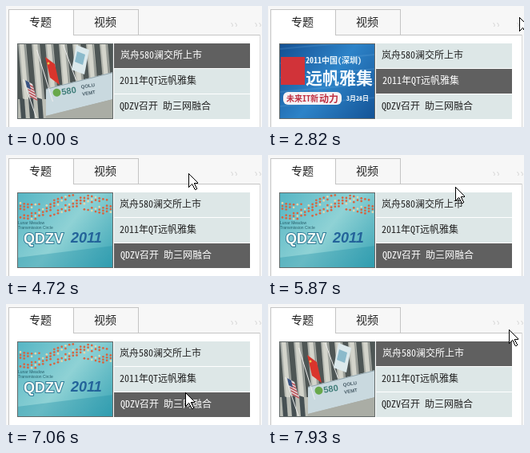
Write an HTML page with a canvas that moves like this. It is 320 px wide and 152 px high and loops after 7.99 s.

```html
<!DOCTYPE html>
<html lang="zh-CN">
<head>
<meta charset="utf-8">
<title>专题</title>
<style>
html, body { margin: 0; width: 100%; height: 100%; overflow: hidden; background: #fff; }
canvas { display: block; width: 320px; height: 152px; }
</style>
</head>
<body>
<canvas id="stage" width="320" height="152"></canvas>
<script>
const ctx = document.getElementById('stage').getContext('2d');
const LOOP = 7990;
const LIST_TOP = 47;
const ROW_STEP = 32;
const CJK = '"Noto Sans Mono CJK SC", "Noto Sans CJK SC", "Noto Sans CJK", sans-serif';
const LATIN = '"Liberation Sans", sans-serif';
const TITLES = ['岚舟580澜交所上市', '2011年QT远帆雅集', 'QDZV召开 助三网融合'];

// The pointer rests between glides.
const ENTRY = { x: 314, y: 14 };
const GLIDES = [
  { start: 2820, end: 3030, x: 283, y: 17 },
  { start: 3560, end: 3990, x: 244, y: 23 },
  { start: 4450, end: 4530, x: 213, y: 23 },
  { start: 4530, end: 4930, x: 244, y: 23 },
  { start: 5690, end: 6080, x: 222, y: 60 },
  { start: 6310, end: 6550, x: 222, y: 93 },
  { start: 6750, end: 6870, x: 224, y: 116 },
  { start: 7030, end: 7300, x: 224, y: 70 },
  { start: 7300, end: 7810, x: 304, y: 66 },
  { start: 7840, end: 7930, x: 301, y: 32 }
];

function pointerAt(time) {
  let { x, y } = ENTRY;
  for (const glide of GLIDES) {
    const k = Math.min(1, Math.max(0, (time - glide.start) / (glide.end - glide.start)));
    x += (glide.x - x) * k;
    y += (glide.y - y) * k;
  }
  return { x: Math.round(x), y: Math.round(y) };
}

// Hovering picks a row; otherwise the list advances every three seconds.
function selectedRow(time, pointer) {
  if (pointer.y >= LIST_TOP) return Math.floor((pointer.y - LIST_TOP) / ROW_STEP);
  return Math.floor((time + 2410) / 3000) % TITLES.length;
}

function rect(x, y, w, h, color) {
  ctx.fillStyle = color;
  ctx.fillRect(x, y, w, h);
}

// Parallelogram: the bottom shifts by dx, the right side by dy.
function quad(color, x, y, w, h, dx = 0, dy = 0) {
  ctx.fillStyle = color;
  ctx.beginPath();
  ctx.moveTo(x, y);
  ctx.lineTo(x + w, y + dy);
  ctx.lineTo(x + w + dx, y + h + dy);
  ctx.lineTo(x + dx, y + h);
  ctx.fill();
}

function circle(x, y, r, color) {
  ctx.fillStyle = color;
  ctx.beginPath();
  ctx.arc(x, y, r, 0, Math.PI * 2);
  ctx.fill();
}

function text(str, x, y, size, color, style = '', family = CJK) {
  ctx.font = `${style} ${size}px ${family}`;
  ctx.fillStyle = color;
  ctx.fillText(str, x, y);
}

// Picture coordinates start at its own top left corner, 120 by 95.
function backdrop(...colors) {
  const fill = ctx.createLinearGradient(0, 0, 120, 95);
  colors.forEach((color, i) => fill.addColorStop(i / (colors.length - 1), color));
  rect(0, 0, 120, 95, fill);
}

function drawBuilding() {
  backdrop('#a3a8a4', '#bfc1b8', '#8d918d');
  for (let x = -6; x < 120; x += 17) {
    quad('#4e5655', x, 0, 7, 70, 6);
    quad('#d3d4cb', x + 9, 0, 5, 70, 6);
    quad('#848a87', x + 15, 0, 1, 70, 6);
  }
  for (let x = 3; x < 36; x += 11) quad('#465053', x, 68, 6, 27, 2, 2);
  quad('#c9d9df', 36, 57, 84, 34, 0, -21);
  quad('#93a5ac', 36, 57, 84, 1, 0, -21);
  quad('#aaada5', 36, 91, 84, 25, 0, -21);

  quad('#eee', 24, 8, 1, 65, 20);
  quad('#d9352c', 35, 17, 12, 26, 6, 9);
  circle(39, 25, 1.5, '#edc34e');
  quad('#eee', 57, 2, 1, 44, 16);
  quad('#dce9ec', 74, 2, 16, 31, -6, 6);
  quad('#8bbacb', 75, 10, 10, 13, -3, 4);

  quad('#eee', 7, 45, 1, 50, 17);
  quad('#e5dcdd', 10, 46, 9, 21, 6, 5);
  for (let y = 49; y < 67; y += 4) quad('#b94d54', 10 + (y - 46) * 0.3, y, 9, 2, 0.5, 5);
  quad('#385282', 10, 46, 5, 9, 2, 3);

  ctx.save();
  ctx.translate(48, 65);
  ctx.rotate(-0.16);
  circle(2, -3, 5, '#68a84b');
  text('580', 8, 1, 11, '#3f7d79', 'bold', LATIN);
  text('QOLU', 33, -3, 6, '#465b66', 'bold', LATIN);
  text('VEMT', 33, 6, 6, '#465b66', 'bold', LATIN);
  ctx.restore();
}

function drawSummit() {
  backdrop('#134f92', '#2d83c8', '#145396');
  for (let y = 6; y < 95; y += 18) quad('rgba(142,203,239,.15)', 0, y, 120, 2, 0, -11);
  text('2011中国(深圳)', 33, 25, 10, '#eaf5fb', 'bold');
  rect(2, 17, 30, 35, '#d13339');
  text('远帆雅集', 33, 51, 21, '#f5fbff', 'bold');
  ctx.fillStyle = '#f6f3f5';
  ctx.beginPath();
  ctx.roundRect(5, 61, 73, 16, 6);
  ctx.fill();
  text('未来IT新', 9, 73, 10, '#bf3042', 'bold');
  text('动力', 50, 74, 12, '#bf3042', 'bold');
  text('3月28日', 84, 72, 8, '#f4f8fb', 'bold');
}

function drawConference() {
  backdrop('#55b5c4', '#8fd2d5', '#39a4b5');
  quad('rgba(30,142,163,.35)', 0, 82, 120, 30, 0, -15);
  for (let row = 0; row < 6; row++) {
    for (let col = 0; col < 25; col++) {
      if (Math.sin(col * 0.7 + row * 1.4) < -0.55) continue;
      const y = 11 + row * 3.6 + Math.sin(col * 0.28 + 0.5) * 5 - col * 0.2;
      circle(4 + col * 4.7, y, 1.35, (col + row) % 4 ? '#d8643f' : '#e4d7ad');
    }
  }
  text('Lunar Meadow', 1, 40, 5, '#28616d', '', LATIN);
  text('Transmission Circle', 1, 46, 5, '#28616d', '', LATIN);
  ctx.font = `bold 18px ${LATIN}`;
  ctx.strokeStyle = '#317c99';
  ctx.lineWidth = 2;
  ctx.strokeText('QDZV', 8, 64);
  text('QDZV', 8, 64, 18, '#f5fbf5', 'bold', LATIN);
  text('2011', 67, 63, 18, '#23639a', 'italic bold', LATIN);
}

const PICTURES = [drawBuilding, drawSummit, drawConference];

function drawPicture(index) {
  ctx.save();
  ctx.translate(14, LIST_TOP);
  ctx.beginPath();
  ctx.rect(0, 0, 120, 95);
  ctx.clip();
  PICTURES[index]();
  ctx.strokeStyle = '#626969';
  ctx.lineWidth = 1;
  ctx.strokeRect(0.5, 0.5, 119, 94);
  ctx.restore();
}

function drawPanel(selected) {
  rect(0, 0, 320, 152, '#f7f7f7');
  for (const x of [281, 286, 311, 316]) {
    quad('#d5d5d5', x, 21, 1, 3, 2);
    quad('#d5d5d5', x + 2, 24, 1, 2, -1);
  }
  rect(3, 36, 315, 116, '#fff');
  rect(3, 4, 81, 33, '#fff');
  const border = '#c4c4c4';
  rect(3, 4, 163, 1, border);
  rect(3, 4, 1, 148, border);
  rect(84, 4, 1, 33, border);
  rect(165, 4, 1, 33, border);
  rect(84, 36, 234, 1, border);
  rect(317, 36, 1, 116, '#d8d8d8');
  text('专题', 29, 25, 14, '#222');
  text('视频', 110, 25, 14, '#222');
  TITLES.forEach((title, i) => {
    const active = i === selected;
    const y = LIST_TOP + i * ROW_STEP;
    rect(135, y, 170, 31, active ? '#606060' : '#dde7e7');
    text(title, active ? 143 : 142, y + 19, 12, active ? '#fff' : '#222');
  });
  drawPicture(selected);
}

// One pixel row: a white run with a black pixel at each end.
function outlinedRun(x, y, width) {
  rect(x, y, width, 1, '#000');
  if (width > 2) rect(x + 1, y, width - 2, 1, '#fff');
}

function drawPointer({ x, y }) {
  for (let row = 0; row < 12; row++) outlinedRun(x, y + row, row + 1);
  rect(x + 7, y + 12, 5, 1, '#000');
  for (let row = 12; row < 18; row++) outlinedRun(x, y + row, 18 - row);
  rect(x + 5, y + 12, 2, 1, '#fff');
  for (let row = 13; row < 20; row++) outlinedRun(x + (row >> 1) - 2, y + row, 4);
  rect(x + 8, y + 20, 2, 1, '#000');
}

function render(now) {
  const time = now % LOOP;
  const pointer = pointerAt(time);
  drawPanel(selectedRow(time, pointer));
  if (time >= GLIDES[0].start) drawPointer(pointer);
  requestAnimationFrame(render);
}

requestAnimationFrame(render);
</script>
</body>
</html>
```
